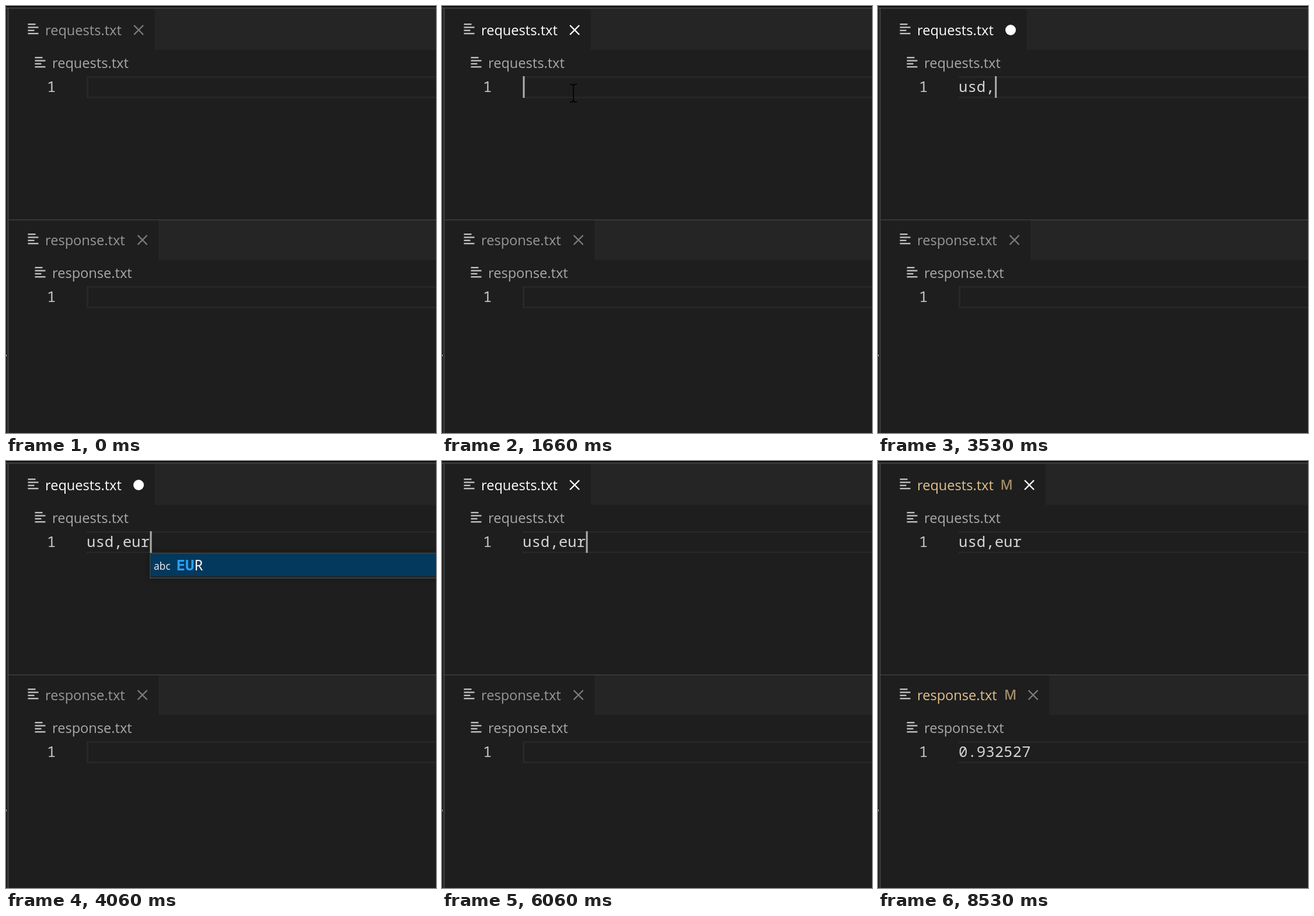
Recreate the animation shown at these times as an HTML page with a canvas. Size 736 by 730 pixels, loop 9000 ms.

```html
<!DOCTYPE html>
<html lang="en">
<head>
<meta charset="utf-8">
<title>Editor session</title>
<style>
  html, body { margin: 0; width: 100%; height: 100%; overflow: hidden; background: #1e1e1e; }
  canvas { display: block; }
</style>
</head>
<body>
<canvas id="stage" width="736" height="730"></canvas>
<script>
const ctx = document.getElementById('stage').getContext('2d');
const W = 736, H = 730, LOOP = 9000, SPLIT = 365;
const UI = '"Open Sans", "Noto Sans", sans-serif';
const MONO = '"Noto Sans Mono", "DejaVu Sans Mono", monospace';
const CHAR = 15.42, TEXT_X = 138, ROW = 38;

// Times in ms at which each value takes effect.
const typing = [[0, ''], [3000, 'u'], [3100, 'us'], [3300, 'usd'], [3530, 'usd,'],
  [3830, 'usd,e'], [3960, 'usd,eu'], [4060, 'usd,eur']];
const popups = [[0, null],
  [3000, ['u', 'unsupported upper username using URL USD']],
  [3100, ['us', 'username using USD unsupported']],
  [3300, ['usd', 'USD unsupported']],
  [3530, null],
  [3900, ['e', 'each else empty error EUR exit']],
  [3960, ['eu', 'EUR']],
  [5160, null]];
const caretStates = [[0, false], [1660, true], [2160, false], [2660, true], [4560, false],
  [5030, true], [5530, false], [6060, true], [6560, false], [7060, true],
  [7560, false], [8060, true], [8530, false]];

const valueAt = (track, t) => track.filter(([start]) => start <= t).pop()[1];
const mix = (a, b, k) => a + (b - a) * k;

function rect(x, y, w, h, color) {
  ctx.fillStyle = color;
  ctx.fillRect(x, y, w, h);
}

function text(str, x, y, color, font) {
  ctx.font = font;
  ctx.fillStyle = color;
  ctx.fillText(str, x, y);
}

const label = (str, x, y, color) => text(str, x, y, color, `23.6px ${UI}`);
const code = (str, x, y, color, weight = 400) =>
  text(str, x, y, color, `${weight} 25.7px ${MONO}`);

function fileIcon(x, y) {
  [13, 18, 11, 18].forEach((w, i) => rect(x, y + i * 5.3, w, 2.4, '#c0c0c0'));
}

function closeMark(x, y, color) {
  ctx.strokeStyle = color;
  ctx.lineWidth = 2.4;
  ctx.beginPath();
  ctx.moveTo(x - 8, y - 8);
  ctx.lineTo(x + 8, y + 8);
  ctx.moveTo(x + 8, y - 8);
  ctx.lineTo(x - 8, y + 8);
  ctx.stroke();
}

function pane(o) {
  const { top, name, tabEnd, modified, focused, dirty, content } = o;
  const tabRight = tabEnd + (modified ? 32 : 0);
  rect(tabRight, top, W - tabRight, o.barBottom - top, '#252526');

  fileIcon(37.5, o.tabY - 20);
  label(name, 67, o.tabY, modified ? '#e2c08d' : focused ? '#ffffff' : '#989898');
  if (modified) text('M', tabEnd - 45, o.tabY - 1, '#a58c68', `600 23px ${UI}`);

  const markX = tabRight - 27.5, markY = o.tabY - 9;
  if (dirty) {
    ctx.fillStyle = '#ffffff';
    ctx.beginPath();
    ctx.arc(markX, markY, 9, 0, Math.PI * 2);
    ctx.fill();
  } else {
    closeMark(markX, markY, focused ? '#ffffff' : '#7c7c7c');
  }

  fileIcon(49.5, o.tabY + 37);
  label(name, 79, o.tabY + 56, '#a9a9a9');

  const line = o.tabY + 70;
  rect(TEXT_X, line, W - TEXT_X, 2.5, '#282828');
  rect(TEXT_X, line + 35, W - TEXT_X, 2.5, '#282828');
  if (!content) rect(TEXT_X, line, 3, 37, '#282828');
  code('1', 70, line + 27, '#c6c6c6');
  code(content, TEXT_X, line + 27, '#d4d4d4');
}

// Highlights the letters of the query in order, as a fuzzy match.
function suggestion(word, query, x, y, selected) {
  let hit = 0;
  [...word].forEach((ch, i) => {
    const match = hit < query.length && ch.toLowerCase() === query[hit];
    if (match) hit++;
    code(ch, x + i * CHAR, y, match ? '#2aa0f5' : selected ? '#f0f0f0' : '#d4d4d4', match ? 700 : 400);
  });
}

function popup(query, words, x) {
  const y = 157, h = words.length * ROW + 6;
  ctx.save();
  ctx.shadowColor = 'rgba(0, 0, 0, 0.36)';
  ctx.shadowBlur = 10;
  rect(x, y, W, h, '#454545');
  ctx.restore();
  rect(x + 1.5, y + 1.5, W, h - 3, '#252526');
  rect(x + 1.5, y + 2, W, ROW, '#04395e');
  words.forEach((word, i) => {
    const base = 187 + i * ROW;
    text('abc', x + 7, base - 1, i ? '#c5c5c5' : '#f0f0f0', `500 17.3px ${UI}`);
    suggestion(word, query, x + 45.5, base, i === 0);
  });
}

function pointer(x, y) {
  ctx.strokeStyle = '#050505';
  ctx.lineWidth = 2;
  ctx.beginPath();
  for (const side of [-1, 1]) {
    const end = y + side * 15;
    ctx.moveTo(x - 6, end);
    ctx.lineTo(x - 2, end);
    ctx.lineTo(x, end - side * 2);
    ctx.lineTo(x + 2, end);
    ctx.lineTo(x + 6, end);
  }
  ctx.moveTo(x, y - 13);
  ctx.lineTo(x, y + 13);
  ctx.stroke();
}

function movePointer(t) {
  if (t >= 360 && t < 400) pointer(402, 534);
  if (t >= 930 && t < 1730) {
    const k = Math.min(1, (t - 930) / 730);
    const ease = 1 - (1 - k) ** 2;
    pointer(mix(237, 225, ease), mix(372, 149, ease));
  } else if (t >= 1730 && t < 1860) {
    const k = Math.min(1, (t - 1700) / 130);
    pointer(mix(225, 187, k), mix(149, 374, k * k));
  }
}

function draw(t) {
  rect(0, 0, W, H, '#1e1e1e');
  const content = valueAt(typing, t);
  const modified = t >= 7930;
  const caretX = TEXT_X + content.length * CHAR;

  pane({ top: 5, barBottom: 75, tabY: 50, tabEnd: 254.5, name: 'requests.txt',
    content, modified, focused: t >= 1660, dirty: t >= 3000 && t < 5930 });
  pane({ top: 366, barBottom: 434, tabY: 409, tabEnd: 261, name: 'response.txt',
    content: t >= 7660 ? '0.932527' : '', modified });

  ctx.save();
  ctx.beginPath();
  ctx.rect(0, 0, W, t < 930 ? H : SPLIT);
  ctx.clip();
  const list = valueAt(popups, t);
  if (list) popup(list[0], list[1].split(' '), caretX);
  if (valueAt(caretStates, t)) rect(caretX + 0.5, 120, 3, 37, '#aeafad');
  movePointer(t);
  ctx.restore();

  rect(0, 0, W, 2, '#0c0c0c');
  rect(0, 2, W, 3, '#383838');
  rect(3, SPLIT, W, 1.2, '#444846');
  rect(2.5, 3, 2, H, '#444444');
  rect(0, 596, 1, 3, '#c8c8c8');
}

function tick() {
  draw(performance.now() % LOOP);
  requestAnimationFrame(tick);
}
tick();
</script>
</body>
</html>
```
